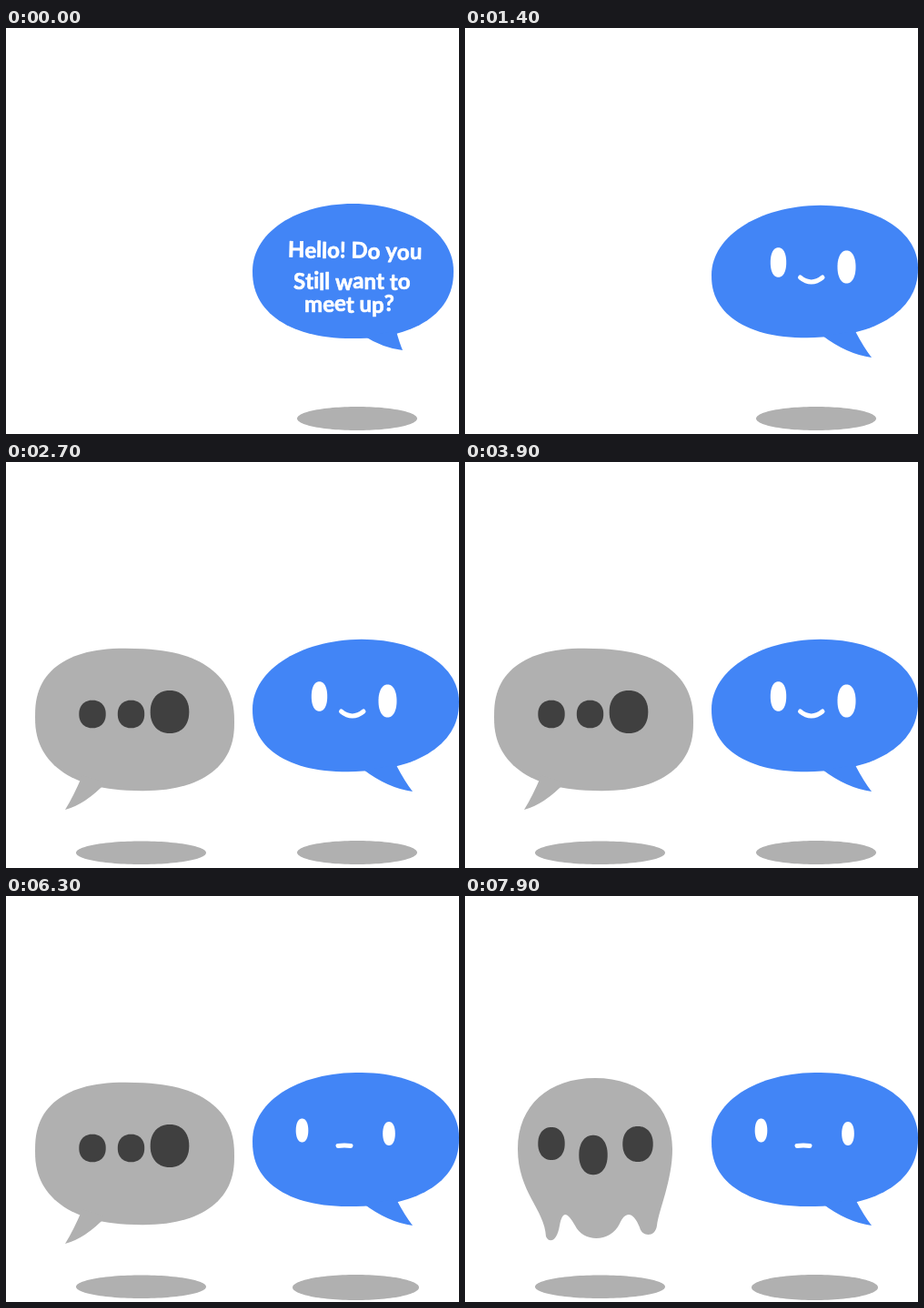
These frames come from a looping animation (498x446 px, 8 s). An HTML page with a canvas:

```html
<!DOCTYPE html>
<html lang="en">
<head>
<meta charset="utf-8">
<title>Chat bubbles</title>
<style>
html, body { margin: 0; width: 100%; height: 100%; overflow: hidden; background: #fff; }
canvas { display: block; width: 498px; height: 446px; }
</style>
</head>
<body>
<canvas id="stage" width="498" height="446" role="img" aria-label="Hello! Do you Still want to meet up?"></canvas>
<script>
const ctx = document.getElementById('stage').getContext('2d');
const BLUE = '#4285f6', GRAY = '#b0b0b0', DARK = '#404040', WHITE = '#fff';
const LOOP = 8000, FACE = 1200, REPLY = 2100, SLOW = 2300, BORED = 5900, GHOST = 7700;

// box: left, top, right, bottom; top and bottom: squareness of each half;
// lean: how far the left side drops; tip: end of the tail.
const blueBubbles = [
  { box: [271, 193, 492, 341], top: 2.05, bottom: 2.25, lean: 0, tip: [436, 354] },
  { box: [274, 197, 494, 341], top: 2.25, bottom: 2.15, lean: 0, tip: [441, 359] },
  { box: [271, 195, 498, 340], top: 2.05, bottom: 2.25, lean: 4, tip: [447, 362] }
];
const boredBubble = { box: [271, 194, 498, 341], top: 2.1, bottom: 2.3, lean: 2, tip: [447, 362] };
const blueTail = { right: [429, 333], left: [393, 338] };

const grayBubbles = [
  { box: [37, 202, 250, 359], top: 2.4, bottom: 2.4, lean: -3, tip: [68, 379] },
  { box: [41, 198, 252, 357], top: 2.5, bottom: 2.45, lean: -4, tip: [72, 376] },
  { box: [32, 205, 251, 361], top: 2.45, bottom: 2.35, lean: -3, tip: [65, 382] }
];
const grayTail = { right: [110, 352], left: [84, 344] };

const ghost = new Path2D(`M58 278C58 230 92 200 143 200C195 200 228 232 228 278
  C228 312 213 345 211 362C209 376 194 374 192 364C185 346 176 346 170 360
  C160 381 130 381 121 362C112 346 107 346 104 362C101 381 92 381 89 374
  C88 345 58 325 58 278Z`);

// Fills a superellipse.
function blob([x0, y0, x1, y1], color, top = 2.2, bottom = top, lean = 0) {
  const cx = (x0 + x1) / 2, cy = (y0 + y1) / 2;
  ctx.fillStyle = color;
  ctx.beginPath();
  for (let i = 0; i < 120; i++) {
    const a = i / 120 * Math.PI * 2, c = Math.cos(a), s = Math.sin(a);
    const p = 2 / (s < 0 ? top : bottom);
    const u = Math.sign(c) * Math.abs(c) ** p;
    const v = Math.sign(s) * Math.abs(s) ** p;
    ctx.lineTo(cx + u * (x1 - x0) / 2, cy + v * (y1 - y0) / 2 - u * lean);
  }
  ctx.fill();
}

const oval = (x, y, rx, ry, color) => blob([x - rx, y - ry, x + rx, y + ry], color);

function bubble({ box, top, bottom, lean, tip }, { right, left }, color) {
  blob(box, color, top, bottom, lean);
  const [x, y] = tip;
  // Each edge of the tail sags a little towards the tip's height.
  const sag = ([bx, by], k) => [(bx + x) / 2, by + (y - by) * k];
  ctx.beginPath();
  ctx.moveTo(...right);
  ctx.quadraticCurveTo(...sag(right, x > right[0] ? 0.6 : 0.8), x, y);
  ctx.quadraticCurveTo(...sag(left, x > left[0] ? 0.85 : 0.6), ...left);
  ctx.fill();
}

function mouth(x0, x1, y, dip) {
  ctx.strokeStyle = WHITE;
  ctx.lineWidth = 5;
  ctx.lineCap = 'round';
  ctx.beginPath();
  ctx.moveTo(x0, y);
  ctx.quadraticCurveTo((x0 + x1) / 2, y + dip, x1, y);
  ctx.stroke();
}

function smile(pose) {
  const wide = pose === 2;
  oval(344.5, 257.5, wide ? 8.7 : 6.5, wide ? 16.3 : 14.5, WHITE);
  oval(419.5, 262.5, wide ? 10 : 6.5, wide ? 18 : 15, WHITE);
  mouth(368.5, 393, wide ? 274 : 275.5, wide ? 10 : 7);
}

function boredFace() {
  oval(325.5, 257.5, 6.8, 13, WHITE);
  oval(421, 261, 6.8, 13, WHITE);
  mouth(365, 379, 274.4, -0.6);
}

// Centred line of text whose letters bob a little, as if written by hand.
function line(text, cx, y, tilt, pose) {
  ctx.save();
  ctx.translate(cx, y);
  ctx.rotate(tilt);
  let x = -ctx.measureText(text).width / 2;
  [...text].forEach((ch, i) => {
    const dy = 0.7 * Math.sin(i * 2.4 + pose * 2);
    ctx.fillText(ch, x, dy);
    ctx.strokeText(ch, x, dy);
    x += ctx.measureText(ch).width;
  });
  ctx.restore();
}

function message(pose) {
  ctx.font = 'bold 24px Lato, sans-serif';
  ctx.fillStyle = ctx.strokeStyle = WHITE;
  ctx.lineWidth = 0.7;
  ctx.lineJoin = 'round';
  line('Hello! Do you', 383, 253, 0.02, pose);
  line('Still want to', 380, 287, 0, pose);
  line('meet up?', 377, 312, 0, pose);
}

function drawBlue(t, pose) {
  const bored = t >= BORED;
  blob(bored ? [315, 416, 454, 444] : [320, 416, 452, 442], GRAY, 2);
  bubble(bored && pose === 2 ? boredBubble : blueBubbles[pose], blueTail, BLUE);
  if (t < FACE) message(pose);
  else if (bored) boredFace();
  else smile(pose);
}

// The big dot travels along the row, one place per pose.
function dots([x0, y0, x1, y1], pose) {
  const cx = (x0 + x1) / 2 - 4, cy = (y0 + y1) / 2 - 6;
  for (let i = 0; i < 3; i++) {
    const x = cx + (i - 1) * 42.5;
    if (i === pose) oval(x, cy - 2.5, 21.3, 23.5, DARK);
    else oval(x, cy, 14.7, 15.3, DARK);
  }
}

function drawGhost(pose) {
  ctx.save();
  ctx.translate([-2, 1, 0][pose], [1, -2, 0][pose]);
  ctx.fillStyle = GRAY;
  ctx.fill(ghost);
  oval(95, 272, 14.7, 18, DARK);
  oval(141, 284.5, 15.7, 21.7, DARK);
  oval(190, 272.5, 16.7, 19.5, DARK);
  ctx.restore();
}

function drawGray(t, pose) {
  blob([77, 416.5, 220, 442], GRAY, 2);
  if (t >= GHOST) return drawGhost(pose);
  bubble(grayBubbles[pose], grayTail, GRAY);
  dots(grayBubbles[pose].box, pose);
}

// Three drawings per cycle; the waiting part runs at half speed.
function poseAt(t) {
  if (t < SLOW) return Math.floor(t / 100) % 3;
  if (t < GHOST) return Math.floor((t - SLOW) / 200) % 3;
  return Math.floor((t - GHOST) / 100) % 3;
}

const start = performance.now();
function draw() {
  const t = Math.max(0, performance.now() - start) % LOOP;
  const pose = poseAt(t);
  ctx.fillStyle = WHITE;
  ctx.fillRect(0, 0, 498, 446);
  if (t >= REPLY) drawGray(t, pose);
  drawBlue(t, pose);
  requestAnimationFrame(draw);
}
draw();
</script>
</body>
</html>
```
